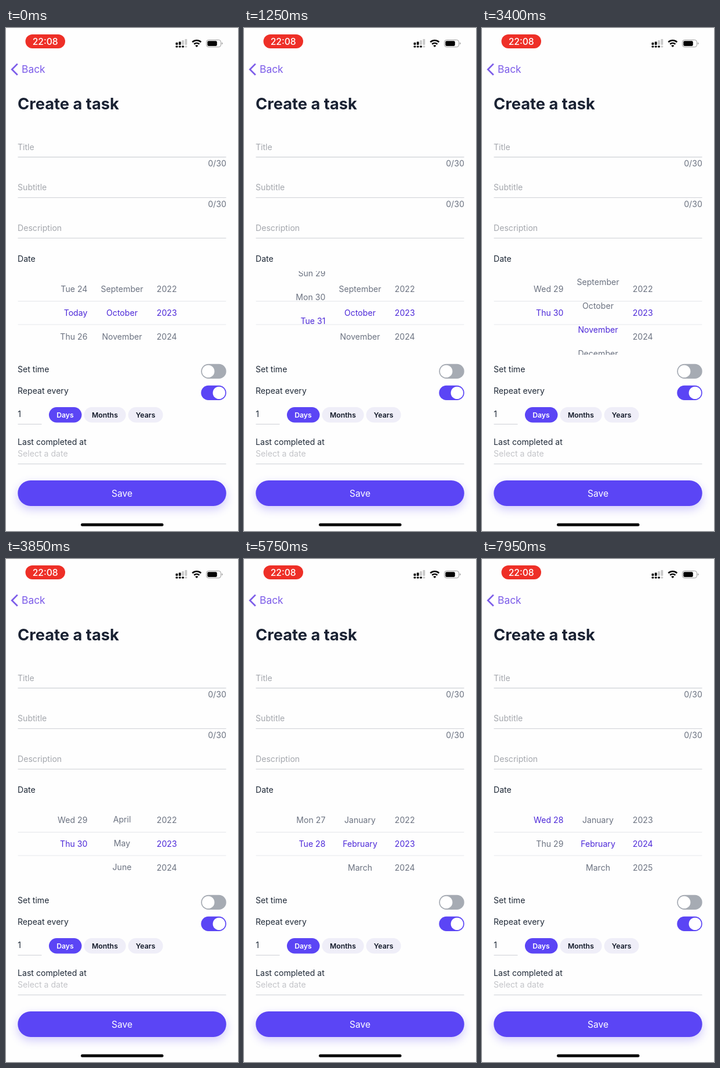
An HTML page that plays this animation: 400x865 px, repeating every 8 s.

```html
<!DOCTYPE html>
<html lang="en">
<head>
<meta charset="utf-8">
<title>Create a task</title>
<style>
  html, body { margin: 0; width: 100%; height: 100%; overflow: hidden; background: #fefefe; }
  svg { display: block; }
  text { font: 14.1px Inter, Roboto, sans-serif; fill: #1f2937; }
  .hint { fill: #a4a7ad; }
  .count { fill: #6b7280; text-anchor: end; }
  .pill { font-size: 12.3px; font-weight: 600; text-anchor: middle; }
  .rule { stroke: #d5d8dc; stroke-width: 1.3; }
  .band { stroke: #e8eaed; stroke-width: 1.2; }
  #picker text { fill: #6b7280; }
  #picker text.selected { fill: #4c28d8; }
</style>
</head>
<body>
<svg width="400" height="865" viewBox="0 0 400 865">
  <defs>
    <clipPath id="window"><rect x="20" y="418" width="360" height="144"/></clipPath>
    <filter id="blur" x="-20%" y="-80%" width="140%" height="260%"><feGaussianBlur stdDeviation="8"/></filter>
  </defs>

  <!-- Status bar -->
  <rect x="33.5" y="11" width="68.5" height="24" rx="12" fill="#ee2f27"/>
  <text x="67.7" y="28.5" text-anchor="middle" style="font-size:15.7px;font-weight:500;fill:#fff">22:08</text>
  <g id="signal"></g>
  <g fill="none" stroke="#050505" stroke-width="2.6">
    <path d="M321.3 24.2a11.2 11.2 0 0 1 15 0"/>
    <path d="M324.2 27.7a7 7 0 0 1 9.2 0"/>
  </g>
  <path d="M326.2 30.4a4 4 0 0 1 5.2 0l-2.6 2.7z" fill="#050505"/>
  <rect x="345.5" y="20.5" width="25" height="12.2" rx="3.8" fill="none" stroke="#9a9a9a"/>
  <rect x="347.2" y="22.2" width="16.6" height="8.8" rx="2.3" fill="#050505"/>
  <path d="M372 24.6q1.5.7 1.5 2t-1.5 2z" fill="#9a9a9a"/>

  <!-- Header and text fields -->
  <path d="M19.8 61.6 10.2 71.2 19.8 80.8" fill="none" stroke="#7c5ce9" stroke-width="2.7"/>
  <text x="27" y="77.3" style="font-size:17.4px;fill:#7c5ce9">Back</text>
  <text x="20" y="139.5" style="font-size:27.3px;font-weight:700;fill:#1a2233">Create a task</text>
  <text class="hint" x="20" y="209.6">Title</text>
  <text class="hint" x="20" y="279.3">Subtitle</text>
  <text class="hint" x="20" y="349">Description</text>
  <path class="rule" d="M20.5 222H379.5M20.5 291.7H379.5M20.5 361.3H379.5M20.5 681.3H61.5M20.5 749.6H379.5"/>
  <text class="count" x="379.8" y="238.3">0/30</text>
  <text class="count" x="379.8" y="308">0/30</text>

  <!-- Date picker -->
  <text x="20" y="402.2">Date</text>
  <path class="band" d="M20.5 469.8H379.5M20.5 510H379.5"/>
  <g id="picker" clip-path="url(#window)"></g>

  <!-- Options -->
  <text x="20" y="592">Set time</text>
  <rect x="336.3" y="577.8" width="43.4" height="25.2" rx="12.6" fill="#a6abb3"/>
  <circle cx="348.7" cy="590.4" r="10.7" fill="#fff"/>
  <text x="20" y="629">Repeat every</text>
  <rect x="336.3" y="614.8" width="43.4" height="25.2" rx="12.6" fill="#5b45f5"/>
  <circle cx="367.3" cy="627.4" r="10.7" fill="#fff"/>
  <text x="20.3" y="668.7">1</text>
  <rect x="74" y="652" width="56.5" height="26.5" rx="13.25" fill="#5b45f5"/>
  <rect x="134.5" y="652" width="72.2" height="26.5" rx="13.25" fill="#efeef8"/>
  <rect x="210.6" y="652" width="60" height="26.5" rx="13.25" fill="#efeef8"/>
  <text class="pill" x="102" y="669.5" style="fill:#fff">Days</text>
  <text class="pill" x="170.4" y="669.5" style="fill:#111827">Months</text>
  <text class="pill" x="240.6" y="669.5" style="fill:#111827">Years</text>
  <text x="20" y="717">Last completed at</text>
  <text x="20" y="737.4" style="fill:#c3c4c8">Select a date</text>

  <!-- Save button and home indicator -->
  <rect x="20" y="784" width="360" height="44" rx="22" fill="#5b45f5" opacity=".28" filter="url(#blur)"/>
  <rect x="20.3" y="778" width="359.4" height="44" rx="22" fill="#5b45f5"/>
  <text x="200" y="805.8" text-anchor="middle" style="font-size:15.6px;fill:#fff">Save</text>
  <rect x="129" y="851.8" width="142.5" height="5" rx="2.5" fill="#050505"/>
</svg>

<script>
const DURATION = 8000, ROW = 41, CENTER = 495;
const MONTHS = ['January', 'February', 'March', 'April', 'May', 'June', 'July',
  'August', 'September', 'October', 'November', 'December'];
const WEEKDAYS = ['Sun', 'Mon', 'Tue', 'Wed', 'Thu', 'Fri', 'Sat'];

// Wheel positions in rows: [time, index]
const dayScroll = [[0, 24], [400, 24], [800, 27], [1250, 29.65], [1500, 30],
  [4800, 30], [5000, 27], [7400, 27], [7800, 28]];
const monthScroll = [[0, 9], [1900, 9], [2200, 9.78], [2450, 10], [3150, 10],
  [3400, 9.29], [3800, 4.5], [4350, 0.37], [4420, 0.33], [4800, 1]];
const yearScroll = [[0, 2023], [6050, 2023], [6500, 2024]];

// Confirmed choices: [time, index]
const dayChoice = [[0, 24], [1200, 30], [5000, 27]];
const monthChoice = [[0, 9], [2450, 10], [4750, 1]];
const yearChoice = [[0, 2023], [6550, 2024]];

const svgNode = (parent, name, attributes) => {
  const node = document.createElementNS('http://www.w3.org/2000/svg', name);
  for (const key in attributes) node.setAttribute(key, attributes[key]);
  return parent.appendChild(node);
};

const step = (keys, t) => keys.filter(key => key[0] <= t).pop()[1];

// Smooth curve through the keys that never overshoots them
function curve(keys, t) {
  const last = keys.length - 1;
  if (t >= keys[last][0]) return keys[last][1];
  const i = keys.findIndex(key => key[0] > t) - 1;
  const rate = k => (keys[k + 1][1] - keys[k][1]) / (keys[k + 1][0] - keys[k][0]);
  const slope = k => {
    if (k === 0 || k === last) return 0;
    const a = rate(k - 1), b = rate(k);
    return a * b > 0 ? 2 * a * b / (a + b) : 0;
  };
  const [t0, v0] = keys[i], [t1, v1] = keys[i + 1];
  const span = t1 - t0, u = (t - t0) / span, w = 1 - u;
  return v0 * w * w * (1 + 2 * u) + v1 * u * u * (3 - 2 * u)
    + span * u * w * (slope(i) * w - slope(i + 1) * u);
}

const picker = document.getElementById('picker');
const column = (x, anchor) => Array.from({ length: 5 },
  () => svgNode(picker, 'text', { x, 'text-anchor': anchor }));
const dayRows = column(140.4, 'end');
const monthRows = column(200, 'middle');
const yearRows = column(277.2, 'middle');

function drawColumn(rows, position, selected, label) {
  const first = Math.round(position) - 2;
  rows.forEach((row, k) => {
    const index = first + k;
    row.textContent = label(index);
    row.setAttribute('y', CENTER + (index - position) * ROW);
    row.classList.toggle('selected', index === selected);
  });
}

function draw(t) {
  const month = step(monthChoice, t), year = step(yearChoice, t);
  const days = new Date(year, month + 1, 0).getDate();
  const dayLabel = index => {
    if (index < 0 || index >= days) return '';
    if (year === 2023 && month === 9 && index === 24) return 'Today';
    return WEEKDAYS[new Date(year, month, index + 1).getDay()] + ' ' + (index + 1);
  };
  drawColumn(dayRows, Math.min(curve(dayScroll, t), days - 1),
    Math.min(step(dayChoice, t), days - 1), dayLabel);
  drawColumn(monthRows, curve(monthScroll, t), month, index => MONTHS[index] || '');
  drawColumn(yearRows, curve(yearScroll, t), year, String);
}

const signal = document.getElementById('signal');
[4, 5.5, 8, 10].forEach((height, i) => {
  const x = 292.5 + i * 5.3, fill = i < 2 ? '#050505' : '#c9c9c9';
  svgNode(signal, 'rect', { x, y: 29 - height, width: 3.8, height, rx: 1, fill });
  svgNode(signal, 'rect', { x, y: 30.4, width: 3.8, height: 3.2, rx: 1, fill: i < 3 ? '#050505' : '#c9c9c9' });
});

const start = performance.now();
function tick() {
  draw((performance.now() - start) % DURATION);
  requestAnimationFrame(tick);
}
tick();
</script>
</body>
</html>
```
